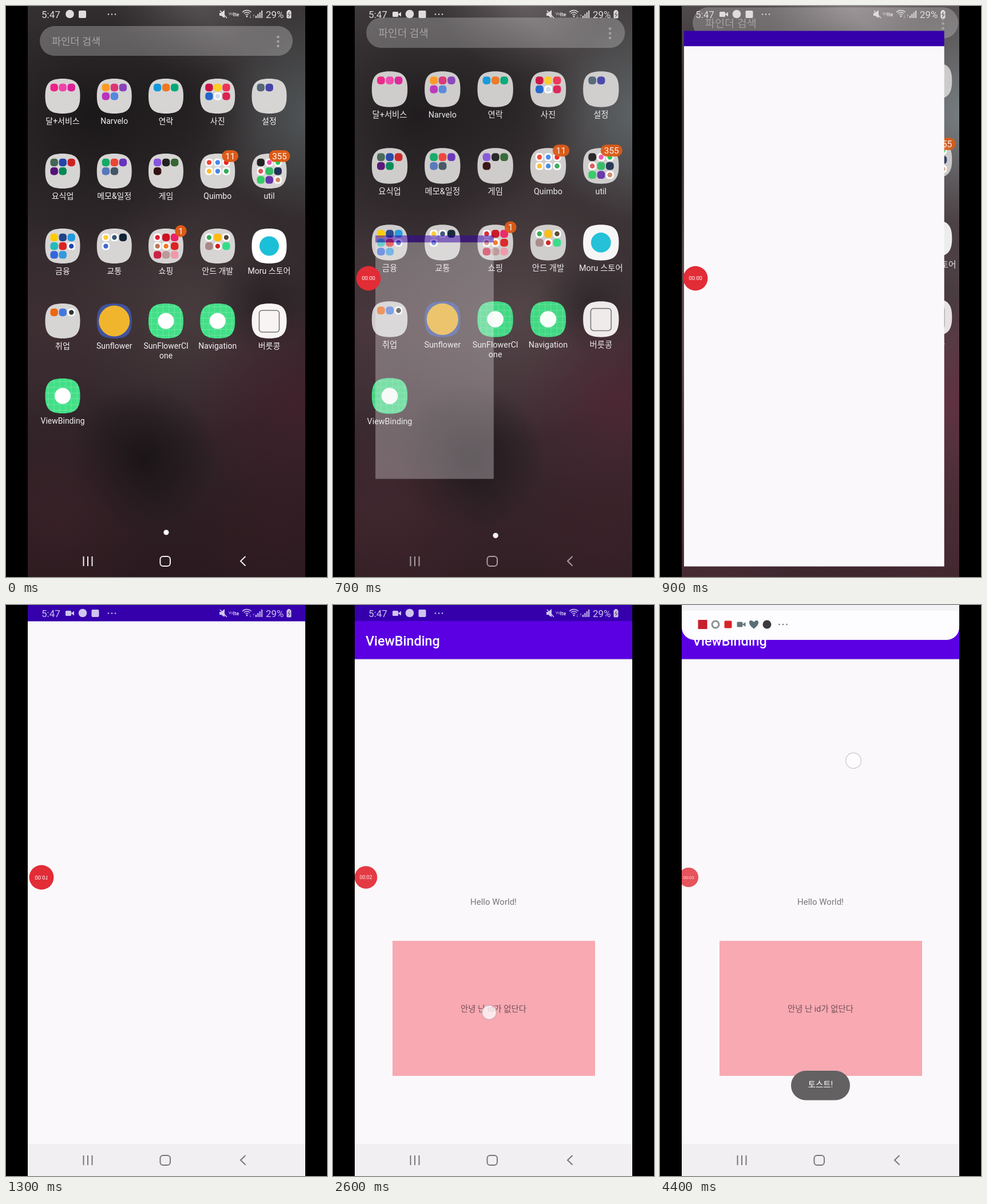
An HTML page with a canvas that plays this animation: 561 px wide and 998 px high, repeating every 4.5 s.

```html
<!DOCTYPE html>
<html lang="ko">
<head>
<meta charset="utf-8">
<style>
html, body { margin: 0; width: 100%; height: 100%; overflow: hidden; background: #000; }
canvas { display: block; }
</style>
</head>
<body>
<canvas id="stage" width="561" height="998"></canvas>
<script>
const c = document.getElementById('stage').getContext('2d');
const LOOP = 4500, STEP = 100;
const FONT = 'Roboto, "Noto Sans CJK KR", "Noto Sans CJK", sans-serif';

const clamp = v => Math.max(0, Math.min(1, v));
const ramp = (t, a, b) => clamp((t - a) / (b - a));
const mix = (a, b, k) => a + (b - a) * k;

function rect(x, y, w, h, fill, r = 0) {
  c.fillStyle = fill;
  c.beginPath();
  c.roundRect(x, y, w, h, r);
  c.fill();
}
function disc(x, y, r, fill) {
  c.fillStyle = fill;
  c.beginPath();
  c.arc(x, y, r, 0, 7);
  c.fill();
}
function line(points, color, width) {
  c.strokeStyle = color;
  c.lineWidth = width;
  c.beginPath();
  points.forEach(([x, y]) => c.lineTo(x, y));
  c.stroke();
}
function text(str, x, y, size, color, align = 'center', weight = 400) {
  c.font = `${weight} ${size}px ${FONT}`;
  c.textAlign = align;
  c.fillStyle = color;
  c.fillText(str, x, y);
}
function layer(alpha, draw) {
  c.save();
  c.globalAlpha *= alpha;
  draw();
  c.restore();
}
function zoom(k, x, y) {
  c.translate(x, y);
  c.scale(k, k);
  c.translate(-x, -y);
}

// Home screen

const BLOBS = [
  [330, -30, 150, '110,104,106,.6'], [540, 190, 190, '92,102,104,.7'],
  [150, 190, 260, '18,16,18,.75'], [300, 170, 150, '24,22,23,.5'],
  [320, 540, 220, '92,78,80,.5'], [70, 560, 190, '78,56,62,.4'],
  [450, 520, 90, '28,25,27,.6'], [500, 690, 190, '76,30,46,.55'],
  [240, 790, 130, '18,16,17,.7'], [90, 890, 170, '66,36,44,.45'],
  [470, 900, 150, '56,28,36,.45']
];
function wallpaper() {
  const g = c.createLinearGradient(0, 0, 0, 998);
  g.addColorStop(0, '#3a3637');
  g.addColorStop(.35, '#332c2e');
  g.addColorStop(.65, '#33272b');
  g.addColorStop(1, '#2a1a1f');
  rect(38, 0, 485, 998, g);
  for (const [x, y, r, rgba] of BLOBS) {
    const b = c.createRadialGradient(x, y, 0, x, y, r);
    b.addColorStop(0, `rgba(${rgba})`);
    b.addColorStop(1, `rgba(${rgba.replace(/[^,]+$/, '0')})`);
    rect(38, 0, 485, 998, b);
  }
}
function brighten(k) {
  c.save();
  c.globalCompositeOperation = 'color-dodge';
  const v = Math.round(90 * k);
  rect(38, 0, 485, 998, `rgb(${v},${v},${v})`);
  c.restore();
}

// Folder contents: one colour per small icon, "w" puts a dot on white, "|" starts a row.
const APPS = [
  ['달+서비스', 'e28 e4a d29'], ['Narvelo', 'f92 d37 84b|b3b 58d'], ['연락', '19d e72 0a7'],
  ['사진', 'c14 fc2 e35|26c cdew d25'], ['설정', '567 44a'],
  ['요식업', '465 24a c22|517 085'], ['메모&일정', '1a6 e43 63b|57b 456'],
  ['게임', '85d 222 363|311'], ['Quimbo', 'e43w 48ew e22w|fb3w 48dw 3a5w', '11'],
  ['util', '222 e5aw 2c5w|d55w 3b6 235|3c6 63a c86w', '355'],
  ['금융', 'fc0 248 29d|2bb d22 24aw|36d 39d'], ['교통', 'fc3w 357w 123|46cw'],
  ['쇼핑', 'd23w c12 e26|b75w e72w d22|c24 b99 e9a', '1'],
  ['안드 개발', '3a5w fb1 543w|a88 c22w 3d8'], ['Moru 스토어', tileDot('#fff', '#1cbfd8', 17)],
  ['취업', 'e61 47d 333w'], ['Sunflower', tileDot('#40529c', '#f0b52c', 27)],
  ['SunFlowerCl|one', droid], ['Navigation', droid], ['버릇콩', outline],
  ['ViewBinding', droid]
];

function tile(x, y, fill) {
  const r = 30.5, k = r * .74;
  c.fillStyle = fill;
  c.beginPath();
  c.moveTo(x - r, y);
  c.bezierCurveTo(x - r, y - k, x - k, y - r, x, y - r);
  c.bezierCurveTo(x + k, y - r, x + r, y - k, x + r, y);
  c.bezierCurveTo(x + r, y + k, x + k, y + r, x, y + r);
  c.bezierCurveTo(x - k, y + r, x - r, y + k, x - r, y);
  c.fill();
}
function tileDot(back, front, r) {
  return (x, y) => { tile(x, y, back); disc(x, y, r, front); };
}
function droid(x, y) {
  tile(x, y, '#42df87');
  c.save();
  c.clip();
  for (let d = -25; d <= 25; d += 10) {
    line([[x + d, y - 31], [x + d, y + 31]], 'rgba(255,255,255,.28)', .7);
    line([[x - 31, y + d], [x + 31, y + d]], 'rgba(255,255,255,.28)', .7);
  }
  c.restore();
  disc(x, y, 14, '#fff');
}
function outline(x, y) {
  tile(x, y, '#f7f4f3');
  c.strokeStyle = '#77747a';
  c.lineWidth = 1.6;
  c.beginPath();
  c.roundRect(x - 17.5, y - 18.5, 35, 38, 5);
  c.stroke();
}
function folder(x, y, icons) {
  tile(x, y, '#d7d5d4');
  icons.split('|').forEach((row, j) => row.split(' ').forEach((icon, i) => {
    const px = x - 14.8 + 15 * i, py = y - 15 + 15.2 * j, color = '#' + icon.slice(0, 3);
    const white = icon.endsWith('w');
    rect(px - 6.7, py - 6.7, 13.4, 13.4, white ? '#fff' : color, 5);
    if (white) disc(px, py, 4.2, color);
  }));
}
function badge(x, y, str) {
  const w = 12 + 8.3 * str.length;
  const cx = x + 30 - 4 * str.length;
  rect(cx - w / 2, y - 36.5, w, 20.5, '#dc5b18', 10);
  text(str, cx, y - 20.8, 15, '#fff');
}
function launcher() {
  rect(59, 35, 442, 52, 'rgba(255,255,255,.26)', 26);
  text('파인더 검색', 80, 68, 17.6, '#aaa6a7', 'left');
  for (const y of [54, 62, 70]) disc(475.5, y, 2.2, '#aaa6a7');
  APPS.forEach(([name, icon, count], n) => {
    const x = 99 + 90.25 * (n % 5), y = 157.5 + 131 * Math.floor(n / 5);
    typeof icon === 'string' ? folder(x, y, icon) : icon(x, y);
    if (count) badge(x, y, count);
    name.split('|').forEach((part, i) => text(part, x, y + 48.5 + 16.5 * i, 14, '#f4f2f3'));
  });
  disc(280, 920, 4.6, '#fff');
}

// System bars

function camera(x, y, color) {
  rect(x - 7.5, y - 4.5, 10, 9, color, 1.5);
  c.beginPath();
  c.moveTo(x + 2, y);
  c.lineTo(x + 7.5, y - 4);
  c.lineTo(x + 7.5, y + 4);
  c.fill();
}
function statusBar(t, color) {
  const k = ramp(t, 100, 550), dx = 22.5 * k;
  text('5:47', 62, 21, 17, color, 'left');
  layer(clamp(k * 3 - 2), () => camera(111.5, 14.5, color));
  disc(111.5 + dx, 14, 7.3, color);
  rect(127 + dx, 8, 13, 13, color, 2);
  for (const x of [k ? 156.5 + dx : 179, 185, 191]) disc(x, 14.5, 1.2, color);

  c.fillStyle = color;
  c.beginPath();
  [[373, 12], [376, 12], [382, 7], [382, 21], [376, 17], [373, 17]].forEach(p => c.lineTo(...p));
  c.fill();
  line([[374, 8], [386, 21]], color, 1.6);
  text('Vo', 389, 16, 7, color, 'left');
  text('lte', 397, 18, 9, color, 'left', 700);
  c.strokeStyle = color;
  c.lineWidth = 1.4;
  for (const r of [3.5, 7, 10.5]) {
    c.beginPath();
    c.arc(421, 18, r, -2.4, -.75);
    c.stroke();
  }
  disc(421, 18, 1.5, color);
  text('↓↑', 424, 20, 6, color, 'left');
  for (let i = 0; i < 4; i++) rect(436 + 3.4 * i, 17 - 3 * i, 2, 4 + 3 * i, color);
  text('29%', 454, 21, 17, color, 'left');
  rect(492.5, 7, 4, 2, color);
  rect(490.5, 8.5, 8, 13, color, 1.5);
  line([[495.5, 10.5], [493, 15], [496.5, 15], [493.5, 19.5]], '#555', 1.1);
}
function navBar(color) {
  for (const x of [135.5, 143, 150.5]) line([[x, 962], [x, 979]], color, 2);
  c.beginPath();
  c.roundRect(269.5, 962, 17.5, 17, 5);
  c.stroke();
  line([[418.5, 962], [410, 970.3], [418.5, 978.5]], color, 2);
}

// App window

function appContent() {
  rect(38, 94, 485, 2, 'rgba(0,0,0,.08)');
  rect(38, 28, 485, 66.5, '#5a00e2');
  text('ViewBinding', 57, 70.5, 23.3, '#fff', 'left', 500);
  text('Hello World!', 280.5, 524, 15, '#777578');
  rect(104, 587, 354, 236, '#f8a9b2');
  text('안녕 난 id가 없단다', 280.5, 711, 14.4, '#735158');
}
function toast() {
  rect(229, 814, 103, 51.5, '#636162', 25.7);
  text('토스트!', 280.5, 842.5, 14.4, '#fff');
}

// Recorder bubble with a clock that flips each second

const FLIPS = [1100, 2100, 3300];
function recorder(t) {
  const grow = ramp(t, 0, 300), dock = ramp(t, 2450, 2850);
  const x = mix(62, 50, dock), size = grow * mix(1, .8, dock);
  let seconds = 0, spin = 1;
  for (const start of FLIPS) {
    if (t > start) seconds++;
    if (t > start && t < start + 400) spin = Math.cos((t - start) / 200 * Math.PI);
  }
  layer(grow * mix(1, .8, dock), () => {
    c.translate(x, 476);
    c.scale(size, size);
    disc(0, 0, 21.4, '#e22c36');
    c.scale(1, spin);
    text('00:0' + seconds, 0, 3.4, 9.5, '#fff');
  });
}

function touch(x, y, r, alpha) {
  layer(alpha, () => {
    disc(x, y, r, 'rgba(255,255,255,.75)');
    c.strokeStyle = 'rgba(150,140,150,.4)';
    c.lineWidth = 1.5;
    c.stroke();
  });
}

function shade(bottom) {
  const y = bottom - 27;
  rect(38, 0, 485, bottom, '#fdfcfe', [0, 0, 22, 22]);
  rect(38, 0, 485, 10, '#f4f2f6');
  rect(66.5, y - 8, 16, 16, '#c8202c');
  c.strokeStyle = '#8b9291';
  c.lineWidth = 3;
  c.beginPath();
  c.arc(97, y, 6, 0, 7);
  c.stroke();
  rect(112.5, y - 6.5, 13, 13, '#d8232a', 2);
  camera(142, y, '#65727a');
  c.fillStyle = '#5c6f78';
  c.beginPath();
  c.moveTo(164, y + 7.5);
  c.bezierCurveTo(150, y - 2, 157, y - 12, 164, y - 4);
  c.bezierCurveTo(171, y - 12, 178, y - 2, 164, y + 7.5);
  c.fill();
  disc(187, y, 7.5, '#3d3a40');
  for (const x of [208.5, 215, 221.5]) disc(x, y, 1.3, '#777');
}

function draw(t) {
  const open = t < 700 ? 0 : t >= 1200 ? 1 : 1 - Math.exp((650 - t) / 90);
  c.clearRect(0, 0, 561, 998);
  c.save();
  c.beginPath();
  c.rect(38, 0, 485, 998);
  c.clip();

  if (open < 1) {
    wallpaper();
    brighten(open);
    layer(1 - .1 * open, () => { zoom(1 + .054 * open, 99, 681); launcher(); });
    layer(1 - .9 * open, () => navBar('#f0eef0'));
  }
  if (open) {
    c.save();
    zoom(open, 101, 699);
    layer(ramp(t, 640, 830), () => rect(38, 28, 485, 970, t < 900 ? '#f1eff1' : '#faf8fb'));
    layer(ramp(t, 600, 800), () => rect(38, 0, 485, 28.5, '#3500ac'));
    c.restore();
    layer(ramp(t, 1300, 1600), appContent);
    layer(ramp(t, 920, 1100), () => {
      rect(38, 942, 485, 56, '#f1eff2');
      navBar('#78767a');
    });
    layer(ramp(t, 2700, 3100), toast);
  }
  statusBar(t, open > .95 ? '#cfc4ef' : '#dedcdd');

  if (t >= 4300) {
    const k = ramp(t, 4200, 4400);
    shade(mix(20, 61, k));
    touch(mix(350, 338, k), mix(20, 272, k), 13.5, 1);
  }
  recorder(t);
  if (t >= 300 && t < 700) touch(107, 684, 12.5, t === 400 || t === 500 ? 1 : .5);
  if (t >= 2500 && t < 2800) touch(273, 712, 12.5, t === 2600 ? 1 : .5);
  c.restore();
}

function tick() {
  const t = performance.now() % LOOP;
  draw(Math.floor(t / STEP) * STEP);
  requestAnimationFrame(tick);
}
tick();
</script>
</body>
</html>
```
